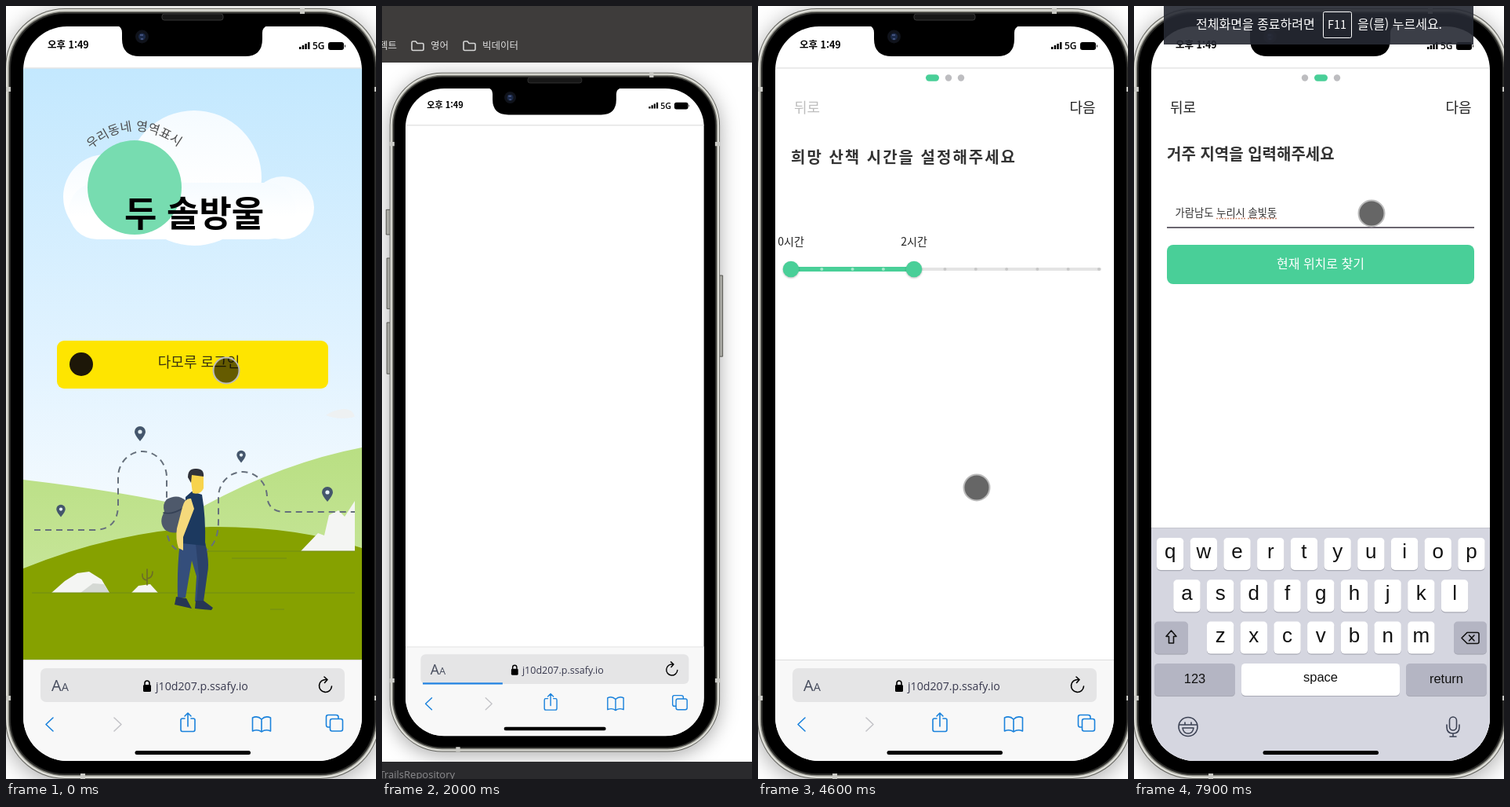
Recreate the animation shown at these times as an HTML page. Size 472 by 984 pixels, loop 8000 ms.

```html
<!DOCTYPE html>
<html lang="ko">
<head>
<meta charset="utf-8">
<style>
html, body { margin: 0; width: 100%; height: 100%; overflow: hidden; background: #fff; }
svg { display: block; }
text { font-family: "Noto Sans CJK KR", "Noto Sans CJK", "Noto Sans", sans-serif; fill: #222; }
.latin { font-family: "Open Sans", "Noto Sans", sans-serif; }
.key { font-family: "Liberation Sans", Arial, sans-serif; fill: #111; text-anchor: middle; }
.mid { text-anchor: middle; }
.bold { font-weight: 700; }
.line { fill: none; stroke-width: 1.6; stroke-linecap: round; stroke-linejoin: round; }
.blue { stroke: #1a82dc; }
.green { fill: #49cf98; }
</style>
</head>
<body>
<svg width="472" height="984" viewBox="0 0 472 984">
  <defs>
    <clipPath id="screen"><rect x="22" y="26" width="432" height="935" rx="56"/></clipPath>
    <linearGradient id="sky" x2="0" y2="1">
      <stop stop-color="#c3e8fe"/><stop offset=".5" stop-color="#e2f3ff"/><stop offset=".75" stop-color="#f4fafe"/>
    </linearGradient>
    <linearGradient id="hill" x2="0" y2="1"><stop stop-color="#b9df83"/><stop offset="1" stop-color="#cfe9a6"/></linearGradient>
    <linearGradient id="cloud" x2="0" y2="1"><stop stop-color="#f5fbff"/><stop offset=".6" stop-color="#fff"/></linearGradient>
    <g id="pin"><path d="M0 9Q-7 1-7-3A7 7 0 0 1 7-3Q7 1 0 9Z" fill="#44566c"/><circle cy="-3" r="2.6" fill="#e6f0f4"/></g>
    <path id="folder" class="line" stroke="#d6d6d6" d="M1 2.5Q1 1 2.500 1H6L8 3.500H14.500Q16 3.500 16 5V11Q16 12.500 14.500 12.500H2.500Q1 12.500 1 11Z"/>
  </defs>
  <rect width="472" height="984" fill="#fff"/>

  <g id="phone">
    <g fill="#c5c5be" stroke="#55554f">
      <path d="M-6 201h6v36h-6zM-5 271h6v73h-6zM-5 364h6v74h-6zM476 296h5v117h-5z"/>
    </g>
    <g id="frame"></g>
    <g fill="#c9c9c4"><path d="M375 3h6v7h-6zM95 977h6v7h-6zM-1 103h7v6h-7zM-1 878h7v6h-7zM470 103h7v6h-7zM470 878h7v6h-7z"/></g>
    <rect x="199" y="10" width="78" height="8" rx="3" fill="#171717" stroke="#363636"/>

    <g clip-path="url(#screen)">
      <rect x="22" y="26" width="432" height="935" fill="#fff"/>

      <g id="login">
        <rect x="22" y="79" width="432" height="753" fill="url(#sky)"/>
        <g fill="url(#cloud)">
          <circle cx="240" cy="219" r="86"/><circle cx="127" cy="243" r="54"/><circle cx="353" cy="257" r="40"/>
          <rect x="80" y="225" width="290" height="72" rx="36"/>
        </g>
        <circle cx="164" cy="231" r="60" fill="#77dcb0"/>
        <path id="arc" d="M105 185Q164 132 228 186" fill="none"/>
        <text font-size="16" style="fill:#4b4b4b"><textPath href="#arc" startOffset="4">우리동네 영역표시</textPath></text>
        <text class="bold" x="151" y="281" font-size="45" style="fill:#000">두 솔방울</text>
        <rect x="65" y="426" width="346" height="61" rx="9" fill="#fee500"/>
        <circle cx="96" cy="456" r="15" fill="#1d1708"/>
        <text class="mid" x="246" y="460" font-size="18" style="fill:#3c3410">다모루 로그인</text>

        <path d="M22 603Q150 618 246 640Q350 582 454 562V832H22Z" fill="url(#hill)"/>
        <path d="M22 716Q140 668 260 663Q370 662 454 690V832H22Z" fill="#86a100"/>
        <path d="M408 521Q418 514 430 513Q442 512 445 523Q425 528 408 521Z" fill="#eef1f2"/>
        <g fill="#f4f5f3"><path d="M376 694L398 671L406 674L412 648L424 642L432 650L445 630V694Z"/>
          <path d="M58 747L75 732L91 722L106 720L122 730L132 747Z"/><path d="M160 747L169 738L184 736L194 747Z"/></g>
        <path d="M95 747L111 735L125 736L132 747Z" fill="#d5d9d4"/>
        <path d="M180 737V717M180 731Q173 730 174 723M180 729Q187 728 187 720" class="line" stroke="#6b6c29"/>
        <path d="M33 747H445M246 694H445M288 703H358M337 768H355" stroke="#718b17" fill="none"/>
        <path d="M36 667H112Q143 667 143 635V600A31 33 0 0 1 205 600V668Q208 697 238 697Q271 697 271 655V625A31 32 0 0 1 333 625Q335 644 356 644H445"
          fill="none" stroke="#66707c" stroke-width="2" stroke-dasharray="8 6"/>
        <use href="#pin" x="171" y="545"/><use href="#pin" x="410" y="622"/>
        <use href="#pin" transform="translate(300 574) scale(.82)"/><use href="#pin" transform="translate(70 643) scale(.82)"/>

        <path d="M205 628Q219 620 230 630L228 665Q217 675 203 667Q194 657 202 644Q199 634 205 628Z" fill="#4e596b"/>
        <path d="M201 645Q212 648 226 639" class="line" stroke="#344055"/>
        <path d="M222 683H254Q260 709 255 722L250 758H241L243 726L237 706L229 753H219Q218 714 222 683Z" fill="#344e7b"/>
        <path d="M242 684L254 683Q260 708 257 722L252 758H243L246 725Z" fill="#2b416a"/>
        <path d="M229 625L237 618L250 622Q255 650 254 687L224 684Q230 653 229 625Z" fill="#1c395f"/>
        <path d="M236 627Q228 626 225 638L218 665Q216 678 220 690L226 693L226 676L240 640Z" fill="#f5d97b"/>
        <path d="M235 597Q243 589 252 597V614Q248 623 238 620Z" fill="#f7d34c"/>
        <path d="M232 600Q232 588 243 589Q253 589 252 599L237 597L236 607Z" fill="#30323a"/>
        <path d="M217 752L230 754L237 767L215 762ZM242 757H252L264 766L262 769L241 767Z" fill="#263754"/>
      </g>

      <g id="form">
        <g id="dots"></g>
        <rect id="hover" x="381" y="111" width="65" height="39" rx="4" fill="#eff6fb"/>
        <text id="back" x="46" y="135.500" font-size="18">뒤로</text>
        <text x="397.500" y="135.500" font-size="18">다음</text>
        <g id="step1">
          <text class="bold" x="42" y="200" font-size="20" letter-spacing="2" style="fill:#333">희망 산책 시간을 설정해주세요</text>
          <text class="mid" x="42" y="305" font-size="14">0시간</text>
          <text class="mid" x="199" y="305" font-size="14">2시간</text>
          <path d="M42 335H436" stroke="#e4e4e4" stroke-width="4" stroke-linecap="round"/>
          <path d="M42 335H199" stroke="#49cf98" stroke-width="6"/>
          <g id="ticks"></g>
          <g class="green" style="filter:drop-shadow(0 1px 1px #0004)"><circle cx="42" cy="335" r="10.300"/><circle cx="199" cy="335" r="10.300"/></g>
        </g>
        <g id="step2">
          <text class="bold" x="42" y="196" font-size="20" style="fill:#333">거주 지역을 입력해주세요</text>
          <text x="52.500" y="268" font-size="13.300" style="fill:#333">가람남도 누리시 솔빛동</text>
          <path id="spell" d="M105 270.500H142M145 270.500H182" stroke="#c98268" stroke-width="1.400" stroke-dasharray="2 1.500"/>
          <path id="under" d="M42 282H434" stroke-width="2"/>
          <g id="find">
            <rect class="green" x="42" y="303" width="392" height="50" rx="8"/>
            <text class="mid" x="238" y="333" font-size="16" style="fill:#fff">현재 위치로 찾기</text>
          </g>
        </g>
      </g>

      <path d="M22 79H454" stroke="#e5e5e5" stroke-width="1.500"/>
      <text class="bold" x="53" y="54" font-size="12.500" style="fill:#000">오후 1:49</text>
      <path d="M374 55v-3h2.500v3zM377.700 55v-5h2.500v5zM381.300 55v-7h2.500v7zM385 55v-9h2.500v9z"/>
      <text class="latin" x="391" y="55" font-size="12" font-weight="600" style="fill:#000">5G</text>
      <rect x="411" y="46" width="20" height="10" rx="3"/><path d="M432 49q2 2 0 4z"/>

      <g id="browser">
        <rect x="22" y="832" width="432" height="130" fill="#f8f8f8"/>
        <path d="M22 832.500H454" stroke="#dedede"/>
        <rect x="44" y="843" width="388" height="43" rx="7" fill="#e5e5e6"/>
        <text class="latin" x="58" y="872" font-size="20" style="fill:#454b5c">A<tspan font-size="14.500">A</tspan></text>
        <rect x="175" y="864" width="10" height="9" rx="1.500"/><path d="M177 864v-2a3 3 0 0 1 6 0v2" class="line" stroke="#000"/>
        <text class="latin" x="191" y="871" font-size="14.200" style="fill:#38394e">j10d207.p.ssafy.io</text>
        <path d="M408.500 857.500A8 8 0 1 0 415.500 866M406 854L410 857.500L406.500 861.500" class="line" stroke="#000"/>
        <rect id="bar" x="47" y="884" height="2.500" fill="#1d80e2"/>
        <path d="M60 906L51 914.500L60 923" class="line blue"/>
        <path d="M138 906L147 914.500L138 923" class="line" stroke="#c4c4c8"/>
        <path d="M228 907H225Q223 907 223 909V921Q223 923.500 225 923.500H239Q241 923.500 241 921V909Q241 907 239 907H236M232 917V900M228 904L232 900L236 904" class="line blue"/>
        <path d="M326 908Q321 903 314.500 906V923Q321 920 326 924Q331 920 337.500 923V906Q331 903 326 908V923" class="line blue"/>
        <path d="M413 918H411Q408.500 918 408.500 915V905Q408.500 902.500 411 902.500H421Q424 902.500 424 905V907" class="line blue"/>
        <rect x="413.500" y="907.500" width="16" height="15.500" rx="2.500" class="line blue"/>
      </g>

      <g id="keyboard">
        <rect x="22" y="664" width="432" height="300" fill="#d5d6e0"/>
        <path d="M22 664.500H454" stroke="#c5c5cd"/>
        <g id="keys"></g>
        <path d="M47.500 795L54 802.500H50.500V811H44.500V802.500H41Z" class="line" stroke="#111"/>
        <path d="M418 804.500L425 797.500H438Q440 797.500 440 799.500V809.500Q440 811.500 438 811.500H425ZM427.500 801L434 808M434 801L427.500 808" class="line" stroke="#111"/>
        <g class="line" stroke="#3c4254"><circle cx="69" cy="917.500" r="12"/><path d="M62 919H76Q75 926 69 926Q63 926 62 919ZM65 912V914M73 912V914M58 915H80"/>
          <rect x="402.500" y="905" width="9" height="17" rx="4.500"/><path d="M399 915V918Q399 926 407 926Q415 926 415 918V915M407 926V930M403 930H411"/></g>
      </g>
      <rect x="164.500" y="948" width="147.500" height="5" rx="2.500"/>
    </g>
    <path d="M142 25H334Q327 27 327 34V42Q327 64 305 64H171Q148 64 148 42V34Q148 27 142 25Z"/>
    <circle cx="173.500" cy="39" r="8.500" fill="#10131b"/><circle cx="173.500" cy="39" r="4.500" fill="#1b2948"/>
    <path d="M171 37h4M172 42h3" stroke="#53618f" stroke-width="1.500"/>
  </g>

  <g id="desk">
    <rect width="472" height="72" fill="#3e3c3b"/>
    <rect id="tabs" width="472" height="31" fill="#272726"/>
    <rect y="962" width="472" height="22" fill="#2a2a2d"/>
    <g font-size="12.500">
      <text x="19" y="54.500" text-anchor="end" style="fill:#ddd">프로젝트</text>
      <text x="62" y="54.500" style="fill:#ddd">영어</text><text x="128" y="54.500" style="fill:#ddd">빅데이터</text>
    </g>
    <use href="#folder" x="37" y="44"/><use href="#folder" x="103" y="44"/>
    <text class="latin" x="93" y="983" text-anchor="end" font-size="13" style="fill:#8c8c8f">TrailsRepository</text>
  </g>

  <g id="banner">
    <rect x="38" width="395" height="49" fill="#262a34" fill-opacity=".9"/>
    <rect x="241.500" y="7.500" width="36" height="33" rx="2" fill="none" stroke="#fff"/>
    <g font-size="16">
      <text x="79" y="28.500" style="fill:#fff">전체화면을 종료하려면</text>
      <text class="mid" x="259" y="28.500" font-size="14.500" style="fill:#fff">F11</text>
      <text x="285" y="28.500" style="fill:#fff">을(를) 누르세요.</text>
    </g>
  </g>
  <circle id="touch" r="16.500" fill="#000" fill-opacity=".6" stroke="#bbb" stroke-width="2"/>
  <path id="arrow" d="M281 462V479L285 475.500L288 481L290.500 480L287.500 474H292Z" fill="#fff" stroke="#111"/>
</svg>
<script>
const $ = id => document.getElementById(id);
const show = (id, on) => $(id).style.display = on ? '' : 'none';
const move = (id, x, y) => $(id).setAttribute('transform', `translate(${x} ${y})`);
const rect = (x, y, w, h, rx, fill, more = '') =>
  `<rect x="${x}" y="${y}" width="${w}" height="${h}" rx="${rx}" fill="${fill}" ${more}/>`;
const dot = (x, y, r, fill) => `<circle cx="${x}" cy="${y}" r="${r}" fill="${fill}"/>`;

// phone body: nested metal rims around black glass
$('frame').innerHTML = [[0, '#64645f'], [1, '#deded8'], [3.5, '#8b8b83'], [5, '#2b2b29'], [7, '#000']]
  .map(([d, c], i) => rect(-1 + d, 3 + d, 478 - 2 * d, 981 - 2 * d, 76 - d, c,
    i ? '' : 'style="filter:drop-shadow(0 5px 14px #0005)"')).join('');

$('ticks').innerHTML = [1, 2, 3, 5, 6, 7, 8, 9, 10]
  .map(i => dot(42 + 39.3 * i, 335, 2, i < 4 ? '#a5e8cb' : '#c8c8c8')).join('');

const key = (x, row, w, label, size = 26, fill = '#fff', base = 26) => {
  const y = 677 + 53.3 * row;
  return rect(x, y + 1.2, w, 41, 5, '#a9aab5') + rect(x, y, w, 41, 5, fill) +
    `<text class="key" x="${x + w / 2}" y="${y + base}" font-size="${size}">${label}</text>`;
};
const grey = '#b4b5c3';
$('keys').innerHTML = [['qwertyuiop', 29], ['asdfghjkl', 50.3], ['zxcvbnm', 93]]
  .map(([chars, x], row) => [...chars].map((c, i) => key(x + 42.7 * i, row, 34.3, c)).join('')).join('') +
  key(26, 2, 43, '', 16, grey) + key(408, 2, 42, '', 16, grey) +
  key(26, 3, 103, '123', 16.5, grey, 25) + key(137, 3, 202, 'space', 16.5, '#fff', 23) +
  key(347, 3, 103, 'return', 16.5, grey, 25);

// eased value at time t through [time, ...values] stops
function at(t, stops) {
  const i = stops.findIndex(s => s[0] > t);
  if (i < 0) return stops[stops.length - 1].slice(1);
  if (!i) return stops[0].slice(1);
  const a = stops[i - 1], b = stops[i];
  const k = (t - a[0]) / (b[0] - a[0]), e = k * k * (3 - 2 * k);
  return a.slice(1).map((v, j) => v + (b[j + 1] - v) * e);
}

const CLICK = 300, EXIT = 1500, READY = 3000, ENTER = 4500, NEXT = 6500, FOCUS = 7600;
const load = [[CLICK, 0], [900, .4], [EXIT - 1, .6], [EXIT, .1], [2000, .3], [READY, .95]];
const path = [[0, 281, 464], [CLICK, 281, 464], [ENTER, 279, 613], [5500, 279, 613], [5800, 211, 430],
  [6300, 433, 131], [NEXT, 423, 126], [7200, 423, 126], [FOCUS, 303, 264]];

function draw(now) {
  const t = now % 8000;
  const desk = t >= EXIT && t < ENTER, second = t >= NEXT, focus = t >= FOCUS;
  $('phone').setAttribute('transform', desk ? 'translate(10.6 82.1) scale(.8815)' : '');
  show('desk', desk);
  show('tabs', t >= READY);
  show('login', t < CLICK);
  show('form', t >= READY);
  show('step1', !second);
  show('step2', second);
  show('hover', second && !focus);
  show('spell', focus);
  $('back').style.fill = second ? '#222' : '#bdbdbd';
  $('under').setAttribute('stroke', focus ? '#6b6670' : '#dedede');
  move('find', 0, focus ? 1 : 0);

  const pill = second ? 1 : 0;
  $('dots').innerHTML = [second ? 218 : 222.5, second ? 238.5 : 243, 259]
    .map((x, i) => i == pill ? rect(x - 8.5, 87.3, 17, 8.5, 4.2, '#49cf98') : dot(x, 91.5, 4.2, '#bdbdc0')).join('');

  show('bar', t >= CLICK && t < READY);
  $('bar').setAttribute('width', 385 * at(t, load)[0]);
  show('keyboard', focus);
  move('keyboard', 0, at(t, [[FOCUS, 300], [7850, 0]])[0]);
  show('banner', t >= ENTER);
  move('banner', 0, at(t, [[ENTER + 200, -50], [ENTER + 450, 0]])[0]);
  show('arrow', t >= CLICK && t < EXIT);
  show('touch', t < CLICK || t >= ENTER);
  move('touch', ...at(t, path));
  requestAnimationFrame(draw);
}
requestAnimationFrame(draw);
</script>
</body>
</html>
```
